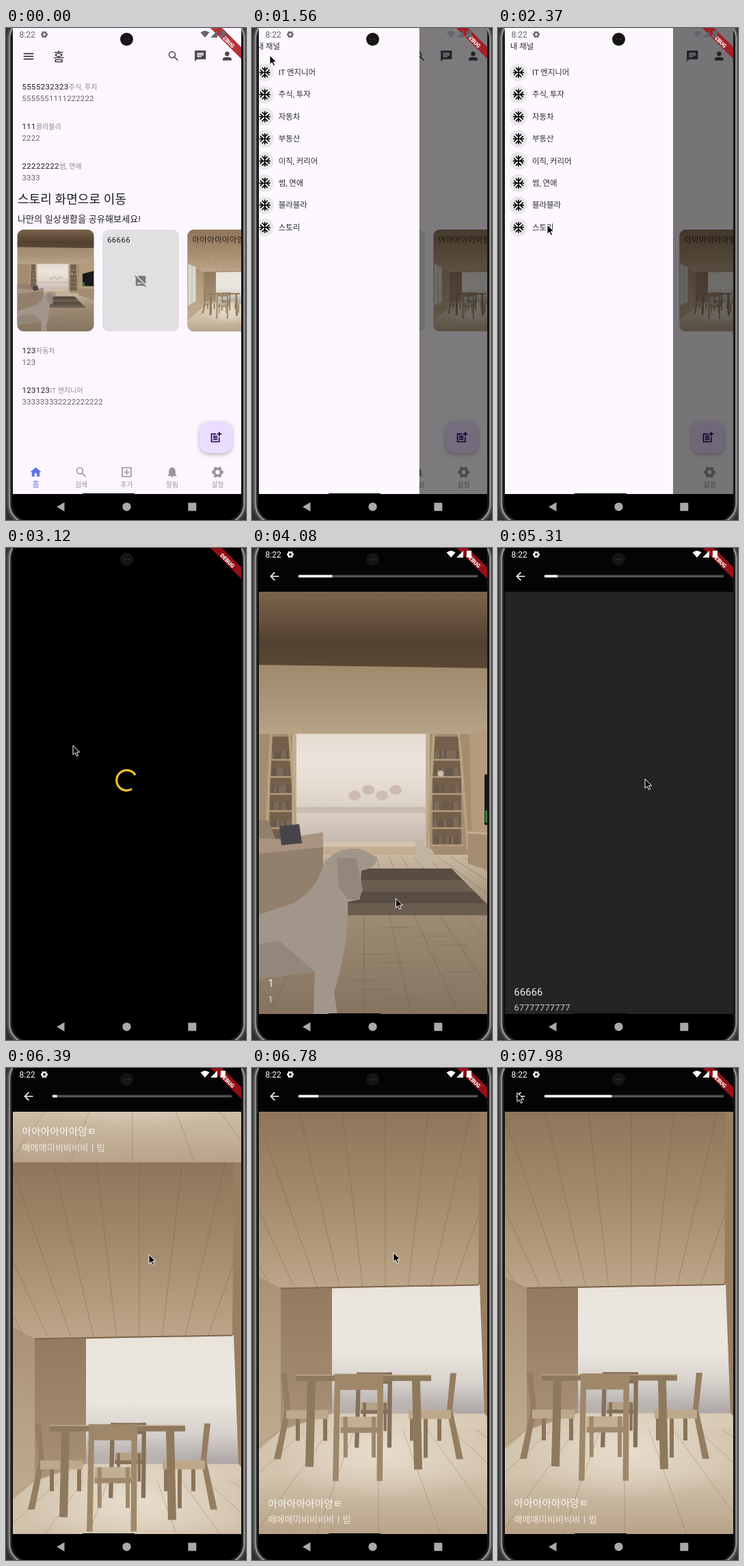
Recreate the animation shown at these times as an HTML page. Size 351 px wide and 720 px high, loop 8 s.

```html
<!DOCTYPE html>
<html lang="ko">
<head>
<meta charset="utf-8">
<title>Phone demo</title>
<style>
html, body { margin: 0; width: 100%; height: 100%; overflow: hidden; background: #303030; }
svg { display: block; width: 100vw; height: 100vh; }
text { font-family: Roboto, 'Noto Sans CJK KR', 'Noto Sans CJK', sans-serif; white-space: pre; }
</style>
</head>
<body>
<svg id="stage" viewBox="0 0 351 720"></svg>
<script>
const LOOP = 8000, PAGE_H = 618, STORY_MS = 4545;
const INK = '#1d1b20', GREY = '#66636a', PALE = '#fcf7fe';

// 24-unit icons: some filled, some stroked
const FILLED = {
  chat: 'M2 2H22V18H6L2 22ZM6 6V8H18V6ZM6 9V11H18V9ZM6 12V14H14V12Z',
  person: 'M8 8a4 4 0 1 1 8 0a4 4 0 1 1-8 0M4 20V18Q4 14 12 14T20 18V20Z',
  home: 'M10 20V14H14V20H19V12H22L12 3 2 12H5V20Z',
  bell: 'M4 19V18L6 16V11Q6 5 12 3Q18 5 18 11V16L20 18V19ZM10 20H14Q14 22 12 22T10 20',
  noImage: 'M5.8 3H21V18.2ZM3 5.8L18.2 21H3ZM5 18H15L12 15 11 17.5 8.5 13.5ZM.7 3.5L2.1 2.1 21.9 21.9 20.5 23.3Z'
};
const STROKED = {
  search: 'M4 9.5a5.5 5.5 0 1 1 11 0a5.5 5.5 0 1 1-11 0M14 14l6 6',
  menu: 'M3 7H21M3 12H21M3 17H21',
  add: 'M4 4H20V20H4ZM12 7V17M7 12H17',
  back: 'M20 12H5M12.5 4.7L5.2 12l7.3 7.3',
  post: 'M12 6H4V20H18V12M7 10H15M7 13H15M7 16H15M18 2V10M14 6H22',
  arm: 'M12 12V2M7 3.6L12 8.6 17 3.6'
};

const range = n => [...Array(n).keys()];
const each = (n, draw) => range(n).map(draw).join('');
const rect = (x, y, w, h, fill, more = '') => `<rect x="${x}" y="${y}" width="${w}" height="${h}" fill="${fill}" ${more}/>`;
const path = (d, fill, more = '') => `<path d="${d}" fill="${fill}" ${more}/>`;
const line = (x1, y1, x2, y2, stroke, w = 1, more = '') =>
  path(`M${x1} ${y1}L${x2} ${y2}`, 'none', `stroke="${stroke}" stroke-width="${w}" ${more}`);
const disc = (x, y, r, fill) => `<circle cx="${x}" cy="${y}" r="${r}" fill="${fill}"/>`;
const oval = (x, y, rx, ry, fill) => `<ellipse cx="${x}" cy="${y}" rx="${rx}" ry="${ry}" fill="${fill}"/>`;
const txt = (x, y, s, size, fill, gap = 0, more = '') =>
  `<text x="${x}" y="${y}" font-size="${size}" fill="${fill}" letter-spacing="${gap}" ${more}>${s}</text>`;
const icon = (name, x, y, color, turn = 0) => {
  const look = FILLED[name] ? `fill="${color}" fill-rule="evenodd"` : `fill="none" stroke="${color}" stroke-width="2"`;
  return `<path d="${FILLED[name] || STROKED[name]}" ${look} transform="translate(${x} ${y}) scale(.81) rotate(${turn}) translate(-12 -12)"/>`;
};
const snow = (x, y) => each(4, i => icon('arm', x, y, '#000', i * 90));
const gear = (x, y, r, color) =>
  `<circle cx="${x}" cy="${y}" r="${r * .6}" fill="none" stroke="${color}" stroke-width="${r * .44}"/>`
  + each(6, i => line(x, y - r * .6, x, y - r, color, r * .5, `transform="rotate(${i * 60 + 30} ${x} ${y})"`));
const fade = (id, ...colors) => `<linearGradient id="${id}" x2="0" y2="1">`
  + colors.map((c, i) => `<stop offset="${i / (colors.length - 1)}" stop-color="${c}"/>`).join('') + '</linearGradient>';

// plank joints fanning out from a vanishing point
const rays = (cx, vy, y0, y1, n, step, color) => each(n, i => {
  const m = (i - (n - 1) / 2) * step;
  return line(cx + m * (y0 - vy), y0, cx + m * (y1 - vy), y1, color, 1, 'opacity=".4"');
});

let seed = 7;
const rnd = () => (seed = seed * 16807 % 2147483647) / 2147483647;

function bookcase(x, w, lean) {
  let s = rect(x, 126, w, 160, '#735f4a');
  for (let y = 160; y < 290; y += 25) {
    for (let b = x + 3; b < x + w - 4; b += 3.5) {
      const h = 11 + rnd() * 4;
      if (rnd() > .15) s += rect(b, y - h, 3, h, rnd() > .5 ? '#68594d' : '#7d6c5c');
    }
    s += line(x - 3, y, x + w + 3, y, '#b39b7c', 2.5);
  }
  return s + line(x + 2, 122, x + 2 - lean, 292, '#b8a182', 4) + line(x + w - 3, 122, x + w + lean, 292, '#b8a182', 4);
}

const livingRoom = () =>
  rect(-60, -86, 480, 112, 'url(#beam)')
  + path('M-60 20L420 27V124H-60Z', 'url(#ceiling)')
  + rect(-60, 122, 480, 190, '#a48c70')
  + path('M318 122L420 90V340L322 300Z', '#b39b7c')
  + rect(59, 121, 201, 180, '#c2ad91') + rect(65, 122, 189, 158, 'url(#pane)')
  + each(4, i => oval(150 + i * 20, 212 - i % 2 * 8, 9, 7, '#cdbcae'))
  + rect(65, 229, 189, 9, '#c9bdb3') + rect(63, 280, 194, 7, '#d5c5ae')
  + bookcase(26, 32, 8) + bookcase(264, 42, 10) + disc(276, 180, 4.5, '#cdbda4')
  + path('M-60 325L20 299H320L420 345V532H-60Z', 'url(#floor)')
  + rays(164, 220, 302, 532, 25, .22, '#655341')
  + each(9, i => { const y = 405 + i * 13, x = 140 + rnd() * 150; return line(x, y, x + 45, y, '#655341', 1, 'opacity=".35"'); })
  + each(4, i => {
    const y = 319 + i * 17, x = 145 - i * 8, r = 292 + i * 17;
    return path(`M${x} ${y}H${r}L${r + 17} ${y + 17.5}H${x - 8}Z`, i % 2 ? '#6a5d50' : '#594d43');
  })
  // sofa and pillow
  + path('M-60 240L24 249 40 290 104 266V350L70 388 -60 430Z', '#927f6c')
  + path('M-60 272L40 276 104 266V288L-60 304Z', '#a7937f')
  + path('M40 257L69 254 73 282 43 285Z', '#45444a')
  // cat
  + oval(254, 302, 13, 14, '#c2b4a2') + path('M238 276L244 280 251 276 254 294H240Z', '#c2b4a2')
  // cabinet and screen
  + path('M316 265L420 272V345L316 312Z', '#a38c70') + line(316, 266, 420, 274, '#c5ae90', 3)
  + path('M340 182L408 164V258L340 255Z', '#17191a') + rect(341, 234, 12, 18, '#2d8a35')
  // dog
  + path('M-60 410L60 370Q95 350 105 312Q125 285 160 291L182 302Q184 318 160 322L158 364 140 368Q142 430 120 500L125 532H90L92 470 -60 490Z', '#a2968a')
  + path('M124 303L152 304 162 350 156 364 140 364 126 345Z', '#93877b')
  + path('M-60 440L40 425 92 470 -60 490Z', '#93877b');

// chair seen from the front or back
function chair(x, y, w, h, color, pale) {
  const leg = w * .12, seat = y + h * .4;
  return rect(x + leg, seat, w - leg * 2, h * .13, pale)
    + each(2, i => rect(x + w * (.18 + i * .58), seat, leg * .7, h * .38, color))
    + line(x + leg / 2, y, x + leg / 2 - 3, y + h, color, leg) + line(x + w - leg / 2, y, x + w - leg / 2 - 1, y + h, color, leg)
    + rect(x, y, w, h * .15, color) + rect(x + leg, seat + h * .1, w - leg * 2, h * .05, color);
}

const sideChair = (x, flip) => `<g transform="translate(${x} 446) scale(${flip} 1)">`
  + path('M0 0H9L14 54 0 126H-10L6 54Z', '#957d61') + rect(8, 54, 62, 13, '#bda88b')
  + each(3, i => rect(22 + i * 20, 67, 6, 32 + i % 2 * 25, '#8b7459')) + '</g>';

const diningRoom = () =>
  rect(-60, 64, 480, PAGE_H, '#b29b7d')
  + path('M-60 64H420V250L331 317 42 322 -60 270Z', 'url(#ceiling2)')
  + rays(195, 610, 64, 319, 13, .115, '#6f583f')
  + path('M-60 268L42 322V565L-60 660Z', 'url(#wall)')
  + path('M-51 271L-5 292V500L-51 525Z', '#d9d8d2') + line(-28, 282, -28, 512, '#a2907a', 2)
  + path('M333 64H420V640L340 520 331 317Z', '#987f62')
  + rect(42, 322, 76, 210, 'url(#panel)') + path('M117 322L333 317 340 507H117Z', 'url(#blind)')
  + line(42, 322, 331, 317, '#7b654d', 2)
  + path('M-60 620L42 530 117 505H340L420 590V682H-60Z', 'url(#floor2)')
  + path('M117 506H341L343 527 117 524Z', '#d8cab5')
  + oval(190, 560, 170, 75, 'url(#glow)')
  + rays(185, 430, 530, 682, 17, .36, '#857055')
  + chair(153, 445, 52, 110, '#85705a', '#b5a289')
  + sideChair(42, 1) + sideChair(299, -1)
  + rect(64, 449, 198, 8.5, '#8f795d') + line(64, 449, 262, 449, '#bca685', 1.5)
  + line(87, 457, 84, 583, '#8f795d', 12) + line(240, 457, 243, 587, '#8f795d', 12)
  + chair(121, 447, 71, 157, '#9f886a', '#c2ae91');

const storyText = (title, sub) => txt(23.5, 642, title, 14.6, '#fff', .2, 'opacity=".93"')
  + txt(23.5, 664.5, sub, 12.96, '#fff', .2, 'opacity=".74"');
const stories = [
  '<use href="#living"/>' + storyText('1', '1'),
  rect(10, 64, 334, PAGE_H, '#242424') + storyText('66666', '67777777777'),
  '<use href="#dining"/>' + storyText('아아아아아아앙ㅌ', '매메매미비비비비ㅣ빕')
];

const post = (y, title, tag, sub) => txt(23.5, y, title, 11.4, INK, .4)
  + txt(23.5 + title.length * 6.83, y, tag, 9.9, '#8b8890', .2) + txt(23.5, y + 17, sub, 11.34, GREY, .2);
const card = (i, body, label, ink) => `<g transform="translate(${16.5 + i * 124.5} 295)"><g clip-path="url(#card)">${body}</g>`
  + txt(7, 19, label, 11.4, ink, .4) + '</g>';
const thumb = photo => `<use href="#${photo}" transform="translate(56 0) scale(.2415) translate(-177 -64)"/>`;

function home() {
  const tabIcons = ['home', 'search', 'add', 'bell'];
  return rect(10, 0, 334, 682, PALE)
    + icon('menu', 33, 41.5, INK) + txt(69, 48.5, '홈', 17.8, INK)
    + ['search', 'chat', 'person'].map((n, i) => icon(n, 245 + i * 39.2, 41, '#49454f')).join('')
    + post(90, '5555232323', '주식, 투자', '5555551111222222')
    + post(148, '111', '블라블라', '2222')
    + post(206, '22222222', '썸, 연애', '3333')
    + txt(17, 257, '스토리 화면으로 이동', 18, INK, .1)
    + txt(17, 284, '나만의 일상생활을 공유해보세요!', 12.96, INK, .2)
    + card(0, thumb('living'), '1', '#4b3a2a')
    + card(1, rect(0, 0, 112, 149, '#e1e0e1') + icon('noImage', 56, 75, '#7a777a'), '66666', INK)
    + card(2, thumb('dining'), '아아아아아아앙ㅌ', '#2b211a')
    + post(476, '123', '자동차', '123')
    + post(534, '123123', 'IT 엔지니어', '333333332222222222')
    + rect(283, 578, 47.5, 46, '#000', 'rx="13" opacity=".28" filter="url(#soft)"')
    + rect(283, 576, 47.5, 46, '#eaddff', 'rx="13"') + icon('post', 307, 599, '#21005d')
    + ['홈', '검색', '추가', '알림', '설정'].map((s, i) => {
      const x = 43.5 + i * 66.5, c = i ? '#98959b' : '#5b74ec';
      return (tabIcons[i] ? icon(tabIcons[i], x, 650, c) : gear(x, 650, 8.3, c))
        + txt(x, 672, s, i ? 9.8 : 11, c, 0, 'text-anchor="middle"');
    }).join('');
}

const drawer = () => rect(10, 0, 246, 682, '#fcf8fe') + txt(18, 31, '내 채널', 11.4, '#2c2a30')
  + ['IT 엔지니어', '주식, 투자', '자동차', '부동산', '이직, 커리어', '썸, 연애', '블라블라', '스토리'].map((s, i) => {
    const y = 65 + i * 32.4;
    return disc(30, y, 13, '#e9e7e9') + snow(30, y) + txt(50, y + 4, s, 11.4, '#2c2a30');
  }).join('');

const statusBar = () => '<g id="status">' + txt(19.5, 13.5, '8:22', 12, 'currentColor') + gear(56, 9.5, 5, 'currentColor')
  + path('M284.5 6.5Q291 1.5 297.5 6.5L291 14ZM299 14L309 4V14ZM314 4H321V14H314Z', 'currentColor') + '</g>';

const frame = (inset, color, w) => rect(inset, inset - 18, 353.5 - inset * 2, 748 - inset * 2, 'none',
  `rx="${34 - inset}" stroke="${color}" stroke-width="${w}"`);

const storyCopy = p => `<g id="copy${p}">` + stories.map(s => `<g>${s}</g>`).join('') + '</g>';

document.getElementById('stage').innerHTML = `<defs>
  ${fade('beam', '#7a644d', '#69533f', '#534030', '#5b4735')}
  ${fade('ceiling', '#a18a6b', '#a8947a', '#b8a486')}
  ${fade('pane', '#e4dcd1', '#ece5dc', '#e4dad0', '#d8cdc3', '#c5b9b0')}
  ${fade('floor', '#cab9a2', '#a08d77', '#93806b', '#86735f')}
  ${fade('ceiling2', '#8f765a', '#a48b6d', '#bda689')}
  ${fade('wall', '#a58d70', '#b9a386', '#c4b196')}
  ${fade('panel', '#937b60', '#a99176')}
  ${fade('blind', '#e9e3da', '#ebe6df', '#ebe6df', '#d8d2cd', '#aaa3a2')}
  ${fade('floor2', '#d3c4ae', '#d2c3ad', '#b8a389')}
  <radialGradient id="glow"><stop stop-color="#efe6d9" stop-opacity=".75"/><stop offset="1" stop-color="#efe6d9" stop-opacity="0"/></radialGradient>
  <filter id="soft" x="-40%" y="-40%" width="180%" height="180%"><feGaussianBlur stdDeviation="3"/></filter>
  <clipPath id="screen"><rect x="10" y="-20" width="334" height="702"/></clipPath>
  <clipPath id="page"><rect x="10" y="64" width="334" height="618"/></clipPath>
  <clipPath id="card"><rect width="112" height="149" rx="9"/></clipPath>
  <g id="living" transform="translate(0 150)">${livingRoom()}</g>
  <g id="dining">${diningRoom()}</g>
</defs>
${rect(0, 0, 351, 720, '#303030')}
${rect(5, -13, 343.5, 738, '#000', 'rx="29"')}${frame(2, '#4c4c4c', 2)}${frame(5, '#8c8c8c', 3)}${frame(8, '#202020', 2)}
<g clip-path="url(#screen)">
  <g id="home">${home()}<rect id="scrim" x="10" width="334" height="682"/><g id="drawer">${drawer()}</g></g>
  <g id="loading">${rect(10, -20, 334, 702, '#000')}<path id="spinner" fill="none" stroke="#f2c12e" stroke-width="3.2"/></g>
  <g id="story">${rect(10, -20, 334, 702, '#040406')}
    <g clip-path="url(#page)">${storyCopy(0)}${storyCopy(1)}</g>
    ${icon('back', 33, 41.5, '#fff')}${rect(68, 39.5, 262, 3.6, '#505052')}<rect id="bar" x="68" y="39.5" height="3.6" fill="#fff"/>
  </g>
  ${path('M299 0H316L344 28V45Z', 'rgba(0,0,0,.35)')}${path('M299 0H316L344 28V45Z', 'rgba(188,20,28,.78)')}
  <text transform="translate(324 18.5) rotate(45)" text-anchor="middle" y="3" font-size="8" font-weight="900" fill="#fff">DEBUG</text>
  ${statusBar()}
</g>
${disc(176.5, 16.5, 9.5, '#151516')}${disc(174, 16.5, 1.1, '#6b2824')}${disc(179, 16.5, 1.1, '#6b2824')}
${rect(112, 681, 76, 2, '#000')}
${path('M74 700.7L85.5 694V707.4Z', '#a9a9a9')}${disc(176.5, 700.7, 6.2, '#a9a9a9')}${rect(266.3, 694.7, 12, 12, '#a9a9a9', 'rx="1"')}
<path id="cursor" d="M0 0V13.5L3.2 10.6 5.5 15.6 7.7 14.6 5.4 9.8H9.8Z" fill="#000" stroke="#fff" stroke-linejoin="round"/>`;

const $ = id => document.getElementById(id);
const set = (id, name, v) => $(id).setAttribute(name, v);
const show = (el, on) => el.setAttribute('display', on ? 'inline' : 'none');
const clamp = v => Math.min(1, Math.max(0, v));
const smooth = v => v * v * (3 - 2 * v);

const swipes = [{ start: 4660, end: 4910, speed: 1.2 }, { start: 6130, end: 6247, speed: 5.6 }];
const began = [3224, 4978, 6276];

// pointer glides: start, end, x, y
const glides = [
  [450, 1290, 26, 40],
  [1650, 2280, 72, 288],
  [2700, 3100, 98, 289],
  [3420, 4170, 215, 522],
  [swipes[0].start, swipes[0].end, 215, 338],
  [5480, 5900, 212, 457],
  [swipes[1].start, swipes[1].end, 209, 273],
  [6700, 7960, 28, 36]
];
const pointer = t => glides.reduce(([px, py], [a, b, x, y]) => {
  const k = smooth(clamp((t - a) / (b - a)));
  return [px + (x - px) * k, py + (y - py) * k];
}, [190, 722]);

// finger drag past a small slop, then a critically damped settle
function shiftOf({ start, end, speed }, t) {
  const drag = Math.max(0, pointer(start)[1] - pointer(Math.min(t, end))[1] - 15);
  if (t < start) return 0;
  if (t < end) return drag;
  const w = .013, left = PAGE_H - drag, d = t - end;
  return PAGE_H - Math.max(0, (left + (w * left - speed) * d) * Math.exp(-w * d));
}

const spring = (t, start) => { const x = .049 * Math.max(0, t - start); return (1 + x) * Math.exp(-x); };

function spin(ms) {
  const u = ms / 1333 % 1, rad = Math.PI, r = 14.8;
  const head = smooth(clamp(u * 2)), tail = smooth(clamp(u * 2 - 1));
  const a = -rad / 2 + tail * 1.5 * rad + ms / 2222 * 2 * rad + u * rad / 2;
  const sweep = Math.max((head - tail) * 1.5 * rad, .01);
  const at = v => `${176.5 + r * Math.cos(v)} ${340 + r * Math.sin(v)}`;
  return `M${at(a)}A${r} ${r} 0 ${sweep > rad ? 1 : 0} 1 ${at(a + sweep)}`;
}

function render(t) {
  const open = t < 2570 ? 1 - spring(t, 1462) : spring(t, 2570);
  set('drawer', 'transform', `translate(${-246 * (1 - open)} 0)`);
  set('scrim', 'fill-opacity', .53 * open);

  const enter = clamp((t - 2560) / 250), grow = 1 - .12 * (1 - enter) ** 3;
  const inStory = t >= began[0];
  show($('home'), enter < 1);
  show($('loading'), enter > 0 && !inStory);
  set('loading', 'opacity', clamp(enter * 2));
  set('loading', 'transform', `translate(177 341) scale(${grow}) translate(-177 -341)`);
  set('spinner', 'd', spin(Math.max(0, t - 2530) * 1.1));

  show($('story'), inStory);
  if (inStory) {
    const n = t < swipes[1].start ? 0 : 1;
    const shift = shiftOf(swipes[n], t);
    const now = n + (shift > PAGE_H / 2 ? 1 : 0);
    range(2).forEach(p => {
      set('copy' + p, 'transform', `translate(0 ${p * PAGE_H - shift})`);
      [...$('copy' + p).children].forEach((el, i) => show(el, i === now));
    });
    set('bar', 'width', 262 * clamp((t - began[now]) / STORY_MS));
  }
  show($('status'), enter < .5 || inStory);
  set('status', 'color', inStory ? '#fff' : '#67646b');

  show($('cursor'), t >= 450);
  set('cursor', 'transform', `translate(${pointer(t).join(' ')})`);
}

const started = performance.now();
function tick() {
  render((performance.now() - started) % LOOP);
  requestAnimationFrame(tick);
}
tick();
</script>
</body>
</html>
```
